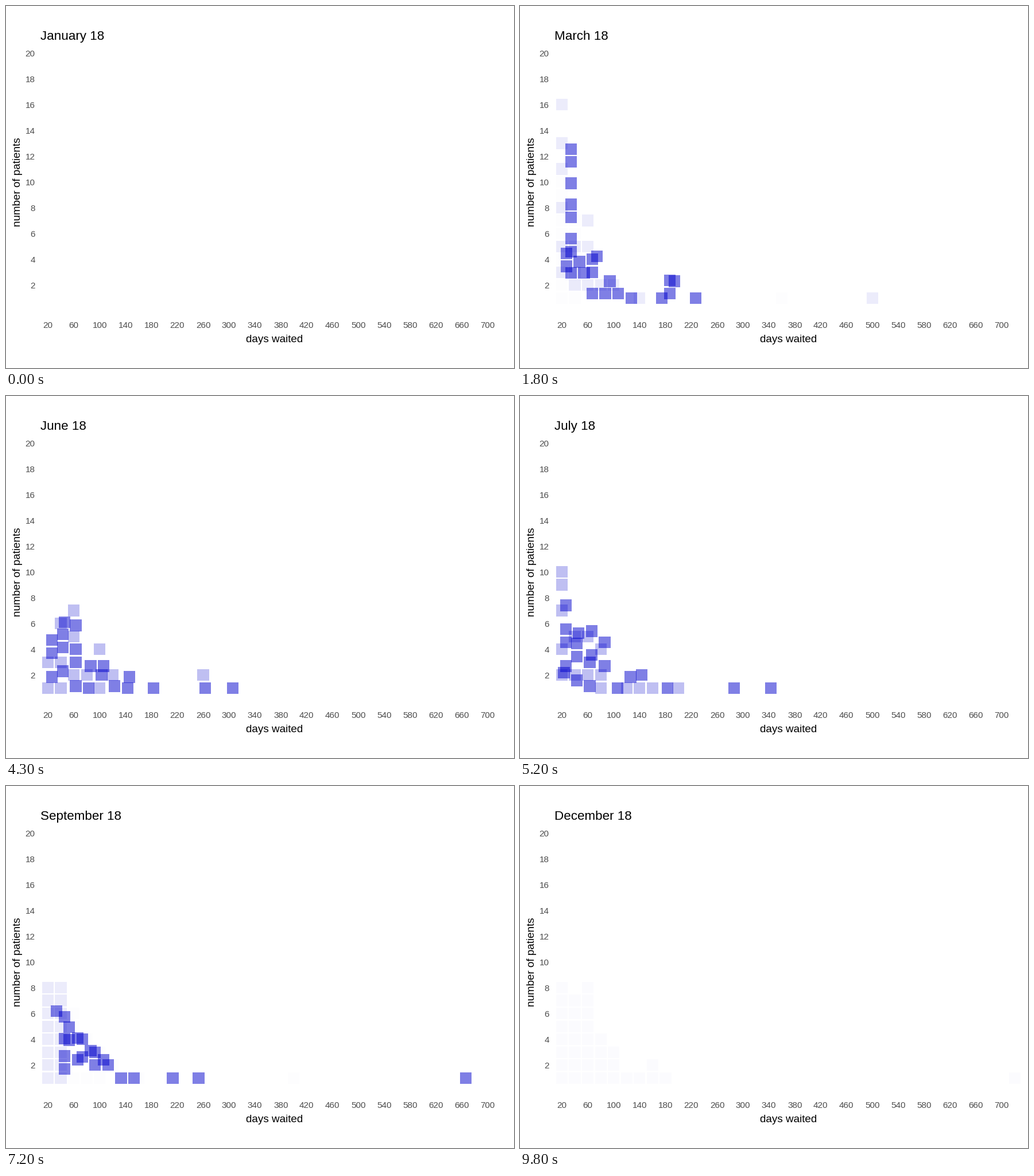
These frames come from a looping animation (885 by 632 pixels, 10 s). A matplotlib script:

```python
import math
from collections import namedtuple

import matplotlib.pyplot as plt
from matplotlib.animation import FuncAnimation
from matplotlib.collections import PolyCollection
from matplotlib.colors import to_rgba

WIDTH, HEIGHT, DPI = 885, 632, 64
FRAMES, INTERVAL = 100, 100
FADE_STEPS, END_STEPS = 6, 5
TILE = 20.27
OPACITY = 0.5
MONTHS = ("January February March April May June July August "
          "September October November December").split()

BIN, DAYS_PER_MONTH = 20, 28.7
KEEP_WAITING = 0.55
GOLDEN = (math.sqrt(5) - 1) / 2

# Patients first listed each month, February to December.
NEW_IN_20 = (10, 16, 10, 11, 5, 10, 12, 9, 8, 8, 8)
NEW_IN_40 = (7, 5, 7, 3, 7, 6, 8, 6, 8, 13, 5)
# Unusually long waits: first month, days waited by then, months on the list.
LONG_WAITS = ((0, 201, 8), (0, 152, 7), (0, 162, 5), (0, 147, 3),
              (0, 480, 2), (2, 372, 2), (4, 157, 6), (6, 623, 5))

STATES = len(NEW_IN_20)
# Frame at which each month's stacks are complete; one step is a frame shorter.
KEYS = [5 + 9 * k - (k > 2) for k in range(STATES)]

Patient = namedtuple("Patient", "first day months")


def build_patients():
    patients = [Patient(*wait) for wait in LONG_WAITS]

    def admit(month, low, high, count):
        for i in range(count):
            u = len(patients) * GOLDEN % 1
            months = 1 + int(math.log(u) / math.log(KEEP_WAITING))
            day = low + (high - low) * (i + 0.5) / count
            patients.append(Patient(month, day, months))

    for month, (n20, n40) in enumerate(zip(NEW_IN_20, NEW_IN_40)):
        admit(month, 29, 40, n20)
        admit(month, 42, 56, n40)
    for day in range(60, 200, BIN):
        admit(0, day, day + BIN, round(10 * math.exp((20 - day) / 50)))
    return patients


def stack_up(patients, month):
    """Place everyone waiting into bins, the shortest waits lowest."""
    waiting = sorted((p.day + DAYS_PER_MONTH * (month - p.first), i)
                     for i, p in enumerate(patients)
                     if p.first <= month < p.first + p.months)
    heights, cells = {}, {}
    for day, i in waiting:
        column = BIN * int(day // BIN)
        heights[column] = heights.get(column, 0) + 1
        cells[i] = (column, heights[column])
    return cells


PATIENTS = build_patients()
STACKS = [stack_up(PATIENTS, month) for month in range(STATES)]


def ease(t):
    t = min(max(t, 0), 1)
    return 4 * t ** 3 if t < 0.5 else 1 - 4 * (1 - t) ** 3


def tiles_at(frame):
    """Return (day, row, strength) for every tile of a frame."""
    if frame <= KEYS[0]:
        strength = ease(frame / END_STEPS)
        return [(*cell, strength) for cell in STACKS[0].values()]
    if frame >= KEYS[-1]:
        strength = 1 - ease((frame - KEYS[-1]) / END_STEPS)
        return [(*cell, strength) for cell in STACKS[-1].values()]
    k = max(i for i, key in enumerate(KEYS) if key <= frame)
    step, length = frame - KEYS[k], KEYS[k + 1] - KEYS[k]
    before, after = STACKS[k], STACKS[k + 1]
    p = ease(step / length)
    fade_out = 1 - ease(step / FADE_STEPS)
    fade_in = ease((step - length + FADE_STEPS) / FADE_STEPS)
    tiles = []
    for i in sorted(before.keys() | after.keys()):
        if i not in after:
            tiles.append((*before[i], fade_out))
        elif i not in before:
            tiles.append((*after[i], fade_in))
        else:
            (x0, y0), (x1, y1) = before[i], after[i]
            tiles.append((x0 + p * (x1 - x0), y0 + p * (y1 - y0), 1))
    return [tile for tile in tiles if tile[2] > 0]


def x_of(day):
    return 73.1 + (day - 20) * 1.1267


def y_of(row):
    return 509.8 - (row - 1) * 22.53


def square(day, row):
    x, y, h = x_of(day), y_of(row), TILE / 2
    return [(x - h, y - h), (x + h, y - h), (x + h, y + h), (x - h, y + h)]


def title_at(frame):
    month = max(0, math.floor((frame - 5.08) / 8.89) + 1)
    return f"{MONTHS[min(month, 11)]} 18"


fig = plt.figure(figsize=(WIDTH / DPI, HEIGHT / DPI), dpi=DPI, facecolor="white")
ax = fig.add_axes([0, 0, 1, 1])
ax.set_xlim(0, WIDTH)
ax.set_ylim(HEIGHT, 0)
ax.axis("off")


def label(x, y, text, px, color="black", **kw):
    return ax.text(x, y, text, fontsize=px * 72 / DPI, color=color,
                   family="Liberation Sans", va="baseline", **kw)


title = label(60, 59, "", 22.4)
label(467.5, 587, "days waited", 18.9, ha="center")
label(25.4, 307, "number of patients", 18.9, ha="center",
      rotation=90, rotation_mode="anchor")
for row in range(2, 21, 2):
    label(50.7, y_of(row) + 6, str(row), 15.2, "#4d4d4d", ha="right")
for day in range(20, 701, 40):
    label(x_of(day), 562.5, str(day), 15.2, "#4d4d4d", ha="center")

tiles = PolyCollection([], edgecolors="none", linewidths=0, antialiaseds=False)
ax.add_collection(tiles, autolim=False)


def draw(frame):
    current = tiles_at(frame)
    tiles.set_verts([square(day, row) for day, row, _ in current])
    tiles.set_facecolor([to_rgba("mediumblue", OPACITY * s) for *_, s in current])
    title.set_text(title_at(frame))
    return tiles, title


def first_draw():
    return draw(0)


animation = FuncAnimation(fig, draw, frames=FRAMES, interval=INTERVAL,
                          repeat=True, repeat_delay=0, init_func=first_draw)
plt.show()
```
